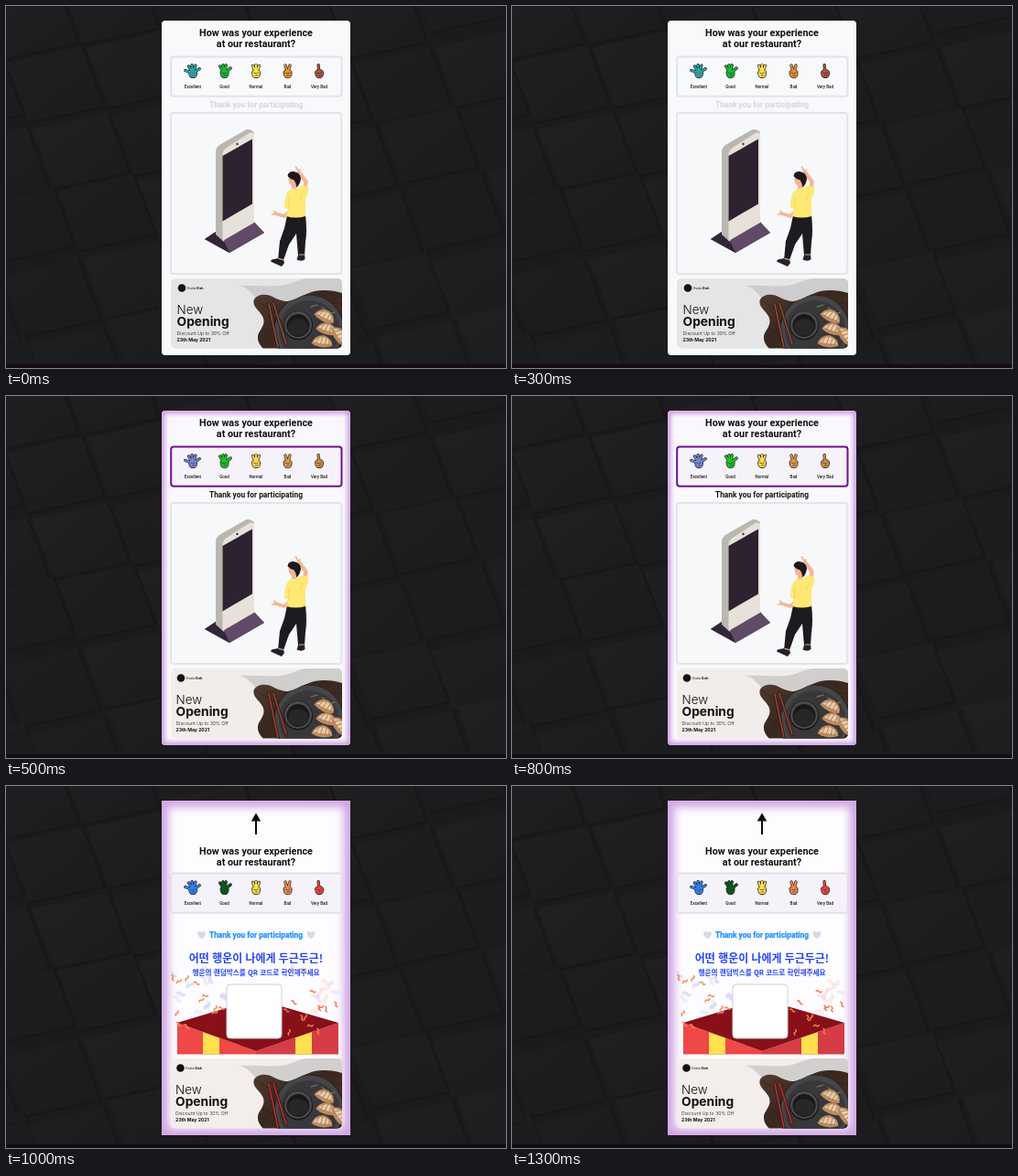
An HTML page that plays this animation: 546 by 396 pixels, repeating every 1.5 s.

```html
<!DOCTYPE html>
<html lang="en">
<head>
<meta charset="utf-8">
<title>Restaurant survey</title>
<style>
html,body{margin:0;width:100%;height:100%;overflow:hidden;background:#1b1a1c}
svg{display:block;width:100vw;height:100vh}
text{font-family:Roboto,sans-serif}
.ad text{font-family:Inter,sans-serif;fill:#111}
text.ko{font-family:"Noto Sans CJK KR","Noto Sans CJK",sans-serif}
</style>
</head>
<body>
<svg viewBox="0 0 546 396" preserveAspectRatio="none">
<defs>
<linearGradient id="tile" x1="0" y1="0" x2="1" y2="1"><stop offset="0" stop-color="#222123"/><stop offset="1" stop-color="#1b1a1c"/></linearGradient>
<linearGradient id="wood" x1="0" y1="0" x2="1" y2="1"><stop offset="0" stop-color="#5a4335"/><stop offset=".5" stop-color="#38271f"/><stop offset="1" stop-color="#4d3428"/></linearGradient>
<filter id="soft" x="-20%" y="-20%" width="140%" height="140%"><feGaussianBlur stdDeviation="2.6"/></filter>
<filter id="wide" x="-20%" y="-20%" width="140%" height="140%"><feGaussianBlur stdDeviation="5"/></filter>
<clipPath id="card"><rect x="170" y="16" width="206" height="366"/></clipPath>
<clipPath id="round"><rect x="170" y="16" width="206" height="366" rx="4"/></clipPath>
<clipPath id="banner"><rect x="180" y="298" width="187" height="76.5" rx="5"/></clipPath>
<clipPath id="photo"><path d="M271 321C274 316 283 314 291 318C299 322 306 325 315 321C326 316 334 311 347 311C355 311 361 312 367 314V375H281C275 369 273 362 277 356C282 348 284 343 277 335C272 330 269 326 271 321Z"/></clipPath>
<clipPath id="gift"><rect x="180" y="188" width="187" height="105.5"/></clipPath>
</defs>
<rect width="546" height="396" fill="#1b1a1c"/>
<g id="wall"></g>
<rect y="392" width="546" height="4" fill="#150c13"/>
<g id="scene"></g>
</svg>
<script>
const $ = id => document.getElementById(id);
const poly = (p, fill, extra = '') => `<polygon points="${p}" fill="${fill}" ${extra}/>`;
const path = (d, fill, extra = '') => `<path d="${d}" fill="${fill}" ${extra}/>`;
const line = (d, color, w, extra = '') => path(d, 'none', `stroke="${color}" stroke-width="${w}" stroke-linecap="round" stroke-linejoin="round" ${extra}`);
const disc = (x, y, r, fill) => `<circle cx="${x}" cy="${y}" r="${r}" fill="${fill}"/>`;
const oval = (x, y, rx, ry, fill) => `<ellipse cx="${x}" cy="${y}" rx="${rx}" ry="${ry}" fill="${fill}"/>`;
const rect = (x, y, w, h, r, fill, extra = '') => `<rect x="${x}" y="${y}" width="${w}" height="${h}" rx="${r}" fill="${fill}" ${extra}/>`;
const text = (s, x, y, size, weight, extra = '') => `<text x="${x}" y="${y}" font-size="${size}" font-weight="${weight}" ${extra}>${s}</text>`;
const mid = (s, y, size, fill, extra = '') => text(s, 273, y, size, 700, `text-anchor="middle" fill="${fill}" ${extra}`);

function random(seed) {
  return () => (seed = (seed * 16807) % 2147483647) / 2147483647;
}

// dark wall of slanted blocks
function wall() {
  const rnd = random(41);
  let s = '';
  for (let r = -1; r < 7; r++) for (let c = -2; c < 8; c++) {
    const x = c * 88 + r * 28, y = r * 72 - c * 18 + 50 + rnd() * 18;
    s += poly(`${x},${y} ${x + 83},${y - 18} ${x + 107},${y + 46} ${x + 25},${y + 64}`, 'url(#tile)', `opacity="${(.3 + rnd() * .6).toFixed(2)}"`);
    s += line(`M${x + 25} ${y + 66}L${x + 108} ${y + 48}L${x + 84} ${y - 17}`, '#131214', 2.5, 'opacity=".4"');
  }
  return s;
}

// finger angles from upright, per rating
const fans = [[-72, -32, -6, 20, 58], [-34, -11, 12, 52], [-24, 0, 24], [-17, 17], [-6]];
const labels = ['Excellent', 'Good', 'Normal', 'Bad', 'Very Bad'];

function hand(i, y, color, fleck) {
  const d = fans[i].map(a => {
    const t = a * Math.PI / 180, u = Math.sin(t), v = Math.cos(t);
    return `M${u * 3} ${2 - v * 3}L${u * 8.6} ${2 - v * 8.6}`;
  }).join('');
  return `<g transform="translate(${204 + i * 34.5} ${y})">` +
    line(d, '#222', 3.3) + path('M-4.5 1Q-4-1.500 0-1.500Q4.500-1.500 4.600 1.500Q4.600 7.400 1 7.400H-1Q-4 7.400-4.500 1Z', color, 'stroke="#222" stroke-width=".9"') +
    line(d, color, 2) + oval(0, 3, 3.6, 3.6, color) +
    line('M-2.500 2Q0 4 2.600 1.600M-.8 5L2 4.400', fleck, .7) + '</g>' +
    text(labels[i], 204 + i * 34.5, y + 18.4, 4.5, 500, 'text-anchor="middle" fill="#1c1c1c"');
}

function ratings(y, st) {
  return rect(180.2, y, 186.3, 43.2, 3, st.box, `stroke="${st.edge}" stroke-width="2"`) +
    st.hands.map((c, i) => hand(i, y + 15.7, c, i ? '#333' : st.fleck)).join('');
}

function kiosk() {
  return poly('217,255 229,247 237,256 271,237 282,248 244,270', '#3b2b40') +
    poly('237,256 271,236 282,248 244,270', '#604a65') +
    poly('217,255 229,247 238,257 244,270', '#33263a') +
    path('M229 160Q229 155 233 152L260 136.500Q264 134 268 136L271 138L238 258L229 250Z', '#b9b7b0') +
    path('M236.500 163Q236.500 158 241 155L264 140Q271 136 271 143V237L236.500 257Z', '#e6e2da') +
    poly('236.500,164 269,145.500 269,216.500 236.500,235.500', '#2d222f') +
    disc(252.5, 151, 1.2, '#34303a');
}

function person() {
  const skin = '#f4b596';
  return line('M326 203L327.500 192L320 182', skin, 4.5) + line('M320 182L316.500 176M319 182L321 179', skin, 1.8) +
    line('M314.500 194V201', skin, 5) + oval(313, 190, 4.6, 6.3, skin) +
    path('M307.500 186Q308 181 314 181Q321.500 182 322 189Q321 196 317 198.500Q317 193 314 190Q311 190 307.500 186Z', '#1d191e') +
    line('M310 224L304 230L294 227', skin, 3.8) + line('M296 227L290.500 228M295 226L292.500 224', skin, 1.6) +
    path('M307 229L327 228Q329 247 327 258L326 273H319L317 249L309 261L303 278H297L299 257Q305 243 307 229Z', '#1d1b20') +
    path('M297 276L303 277.500L304 281L301 285L289 279.500L290 277.500Z', '#252128') +
    path('M319.500 271H326L326.500 277Q323 280 317.500 277.500Z', '#252128') +
    line('M298 276.300L302.500 277.500M320.500 272H325.500', '#dca98e', 1.2) +
    path('M308 203Q311 199 317 200L323 196L330 198Q331 204 327 211L327 230Q316 233 306 230L308 222L304 221Q304 208 308 203Z', '#ffe873') +
    line('M309 210L308.500 222M324 205L321 212', '#e9ca52', .7);
}

function dumpling(x, y, turn) {
  return `<g transform="translate(${x} ${y}) rotate(${turn})">` +
    path('M-11 4Q-9-6 1-7Q11-5 12 3Q0 9-11 4Z', '#bd8b60') +
    path('M-9 2Q-6-4 1-5Q8-4 10 1Q0 3-9 2Z', '#e5cdac') +
    line('M-6 3L-4-4M-1 3L0-5M4 3L4-4M8 3L8-2', '#a87348', .8) + '</g>';
}

function banner(st) {
  const x = st.adX, sticks = 'M287 326L297 374M292 325L306 370';
  return '<g class="ad" clip-path="url(#banner)">' + rect(180, 298, 187, 77, 5, st.paper) +
    path('M255 306C275 305 297 309 312 303C321 299 326 298 334 298H367V322H275C269 315 264 308 255 306Z', st.blob) +
    '<g clip-path="url(#photo)">' + rect(266, 298, 102, 78, 0, 'url(#wood)') +
    line('M272 322L300 338M315 319L367 326M272 350L330 375', '#291d18', 1, 'opacity=".5"') +
    disc(331, 355, 39, '#211f20') + disc(331, 354, 37.5, '#464547') + disc(331, 355, 33, '#38373a') +
    line(sticks, '#271311', 3.2) + line(sticks, st.stick, 1.8) +
    disc(319, 349.5, 16, '#161618') + disc(319, 349, 15, '#4b4b4e') + disc(319, 349.5, 12.5, '#18181a') + oval(319, 351.5, 11, 9.5, '#27272a') +
    dumpling(348, 339, 28) + dumpling(350, 353, 20) + dumpling(345, 367, 10) + dumpling(364, 360, 60) +
    line('M333 329L340 327M345 330L350 333M355 336L359 335', '#71805a', 1.2) + '</g>' +
    disc(x + 5.5, 308.5, 4.3, '#111') +
    text('Ovela <tspan font-weight="700">Dish</tspan>', x + 11, 309.8, 3.5, 400) +
    text('New', x, 337, 13.4, 300) + text('Opening', x, 350.3, 13.8, 700) +
    text('Discount Up to 30% Off', x, 360.3, 5.2, 300) + text('23th May 2021', x, 367.2, 5.1, 700) + '</g>';
}

function heart(x, y) {
  return path(`M${x} ${y + 4.5}C${x - 8} ${y - 1} ${x - 3.5} ${y - 6} ${x} ${y - 2.7}C${x + 3.5} ${y - 6} ${x + 8} ${y - 1} ${x} ${y + 4.5}Z`, '#dcd9e2');
}

// ribbons of confetti, scattered left and right of the centre
function curls(seed, n, colors, size, w, top, span, alpha) {
  const rnd = random(seed);
  let s = '';
  for (let i = 0; i < n; i++) {
    const x = (i % 2 ? 304 : 182) + rnd() * 57, y = top + rnd() * span;
    s += line(`M${-size} 0q${size / 2} ${-size * .6} ${size} 0t${size} 0`, colors[i % colors.length], w,
      `opacity="${alpha}" transform="translate(${x} ${y}) rotate(${rnd() * 180})"`);
  }
  return s;
}

function gift() {
  const lid = '187,259 273,233 363,259 273,290';
  return '<g clip-path="url(#gift)">' +
    curls(77, 26, ['#c9c4f2', '#ffd9c6', '#cfe6f0', '#efd6ea'], 3.6, 3.4, 200, 48, .5) +
    poly('187,259 273,290 273,294 187,294', '#f04747') + poly('273,290 363,259 363,294 273,294', '#d63c45') +
    poly('215,268 233,275 233,294 215,294', '#ffe04f') + poly('316,275 334,269 334,294 316,294', '#ffe04f') +
    poly(lid, '#871019') +
    curls(23, 24, ['#fa865b', '#f27b50'], 3, 1.5, 208, 66, 1) + '</g>' +
    rect(241, 217, 60, 59, 4, '#fff', 'stroke="#d5cfd3" stroke-width="1"');
}

function glow(filter, w, color, clip) {
  return `<g clip-path="url(#${clip})"><rect x="170" y="16" width="206" height="366" fill="none" stroke="${color}" stroke-width="${w}" filter="url(#${filter})"/></g>`;
}

const states = [
  { fill: '#f8f9fb', box: '#f8f9fb', edge: '#e1e3e7', thanks: '#d4d6da', paper: '#e5e5e6', blob: '#cdcdce', stick: '#8a4a35', adX: 186.5, fleck: '#c8383a',
    hands: ['#20aaa8', '#13bd32', '#ffe04c', '#ef922f', '#b2563c'] },
  { fill: '#f9f9fc', box: '#f5f2fa', edge: '#6c128f', thanks: '#151515', paper: '#f1edeb', blob: '#d0cfce', stick: '#94402f', adX: 185.5, fleck: '#34406e',
    hands: ['#7586d3', '#17c91f', '#ffda4d', '#e59a4b', '#d7923f'] },
  { fill: '#fdfcff', box: '#f5f2fa', edge: '#e3deea', paper: '#f3eeeb', blob: '#d2d0ce', stick: '#b52f2c', adX: 185, fleck: '#24467e',
    hands: ['#2f83ee', '#0b5a1d', '#ffdf4a', '#fb8850', '#f8423f'] }
];

function title(y) {
  return mid('How was your experience', y, 10.8, '#111') + mid('at our restaurant?', y + 12.4, 10.8, '#111');
}

function draw(k) {
  const st = states[k];
  let s = rect(170, 16, 206, 366, k < 2 ? 4 : 0, st.fill);
  if (k == 1) s += glow('soft', 7, '#cd9ee4', 'round');
  if (k == 2) s += glow('wide', 14, '#cfa3e3', 'card');
  if (k < 2) {
    s += title(32.7) + ratings(55.5, st) + mid('Thank you for participating', 111, 8.4, st.thanks) +
      rect(180, 117, 186.3, 176, 3, '#f7f8fa', 'stroke="#e2e4e8" stroke-width="2"') + kiosk() + person();
  } else {
    s += line('M273 53V36', '#0c0c0c', 2, 'style="stroke-linecap:butt"') + poly('273,29.500 278.300,38.500 267.700,38.500', '#0c0c0c') +
      title(74.7) + ratings(95.5, st) + heart(213.5, 162.7) + heart(333, 162.7) +
      mid('Thank you for participating', 166, 8.4, '#2391ff', 'stroke="#2391ff" stroke-width=".25"') + gift() +
      mid('어떤 행운이 나에게 두근두근!', 193, 11.95, '#2446f2', 'class="ko" lang="ko"') +
      mid('행운의 랜덤박스를 QR 코드로 확인해주세요', 206.5, 7.65, '#2446f2', 'class="ko" lang="ko"');
  }
  return s + banner(st);
}

$('wall').innerHTML = wall();
let shown = -1;
function frame() {
  const k = Math.floor(performance.now() % 1500 / 500);
  if (k != shown) $('scene').innerHTML = draw(shown = k);
  requestAnimationFrame(frame);
}
frame();
</script>
</body>
</html>
```
